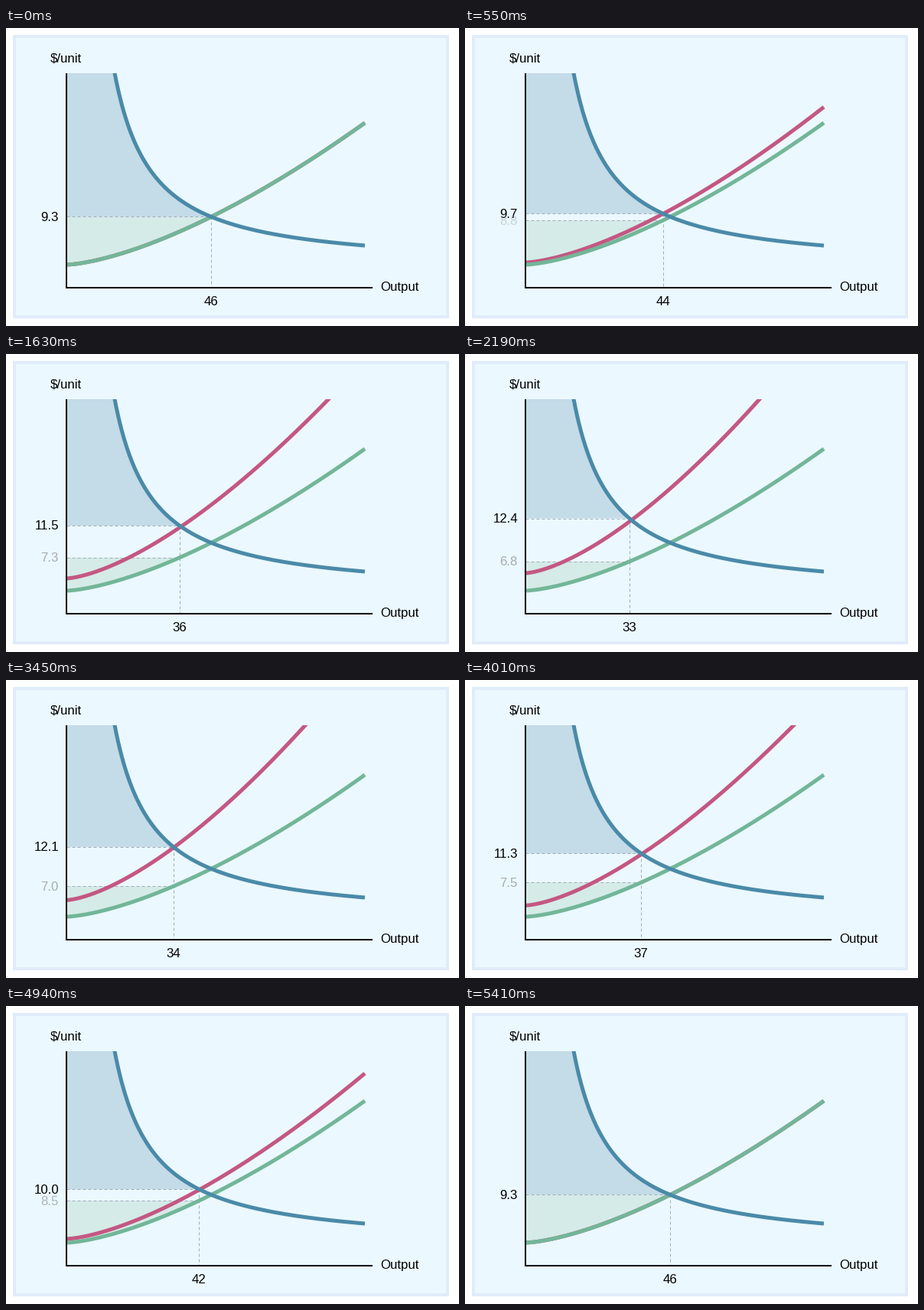
These frames come from a looping animation (592 by 389 pixels, 5500 ms). A matplotlib script:

```python
import numpy as np
import matplotlib.pyplot as plt
from matplotlib.animation import FuncAnimation
from matplotlib.patches import Polygon, Rectangle

W, H, DPI = 592, 389, 100
PX = 72 / DPI
LOOP, STEP = 5500, 50

# plot geometry in pixels
X0, Y0, TOP = 79, 339, 59
SX, SY, QMAX = 390 / 95, 10, 95

PANEL, BORDER = "#ebf8ff", "#e0ecf9"
BLUE, GREEN, RED = "#4a8aa8", "#72b698", "#c45783"
BLUE_FILL, GREEN_FILL = "#c4dbe8", "#d5ebe8"
DASH, MUTED = "#a3aeb8", "#a8abb2"

# markup over time: equilibrium guides run slightly ahead of the curve
GUIDE_T = [0, 300, 1050, 1600, 2150, 3250, 3450, 4500, 5000, 5400]
GUIDE_M = [1, 1, 1.30, 1.571, 1.83, 1.83, 1.737, 1.30, 1.145, 1]
CURVE_T = [0, 300, 1050, 1600, 2150, 2350, 3250, 3450, 4500, 5000, 5400]
CURVE_M = [1, 1, 1.288, 1.535, 1.765, 1.83, 1.83, 1.722, 1.28, 1.138, 1]


def supply(q):
    return 3 + 0.02 * q ** 1.5


def demand(q):
    return 2.644 + 468 / (q - 2) ** 1.125


def px(q):
    return X0 + SX * q


def py(p):
    return Y0 - SY * p


grid = np.linspace(25, 60, 3000)
ratio = demand(grid) / supply(grid)


def equilibrium(m):
    return np.interp(m, ratio[::-1], grid[::-1])


def points(q, p):
    return np.column_stack([px(q), py(p)])


plt.rcParams["font.family"] = "Liberation Sans"
fig = plt.figure(figsize=(W / DPI, H / DPI), dpi=DPI, facecolor="white")
ax = fig.add_axes([0, 0, 1, 1])
ax.set_xlim(0, W)
ax.set_ylim(H, 0)
ax.axis("off")

ax.add_patch(Rectangle((9, 9), 570, 370, fc=BORDER, lw=0))
ax.add_patch(Rectangle((13, 13), 562, 362, fc=PANEL, lw=0))
window = Rectangle((X0, TOP), 400, Y0 - TOP, transform=ax.transData)


def area(color):
    patch = Polygon([(0, 0), (1, 0), (1, 1)], fc=color, lw=0, zorder=2)
    return ax.add_patch(patch)


def guide():
    return ax.plot([], [], color=DASH, lw=PX, ls=(0, (4, 3)), zorder=3,
                   dash_capstyle="butt")[0]


def curve(color, q, p, z):
    line, = ax.plot(px(q), py(p), color=color, lw=5 * PX, zorder=z,
                    solid_capstyle="butt")
    line.set_clip_path(window)
    return line


def label(x, y, text="", ha="left", color="black"):
    return ax.text(x, y, text, ha=ha, va="baseline", color=color,
                   fontsize=16.8 * PX, zorder=9)


surplus, cost = area(BLUE_FILL), area(GREEN_FILL)
price_line, cost_line, output_line = guide(), guide(), guide()

q_all = np.linspace(0, QMAX, 240)
q_dem = np.linspace(14, QMAX, 400)
red = curve(RED, q_all, supply(q_all), 4)
curve(GREEN, q_all, supply(q_all), 5)
curve(BLUE, q_dem, demand(q_dem), 6)

ax.plot([X0, X0, 479], [TOP, Y0, Y0], color="black", lw=2 * PX, zorder=8,
        solid_capstyle="butt", solid_joinstyle="miter")
label(58, 44, "$/unit".replace("$", r"\$"))
label(489, 343, "Output")
price_text = label(69, 0, ha="right")
cost_text = label(69, 0, ha="right", color=MUTED)
output_text = label(0, 362, ha="center")

q_top = np.interp(28, demand(q_dem)[::-1], q_dem[::-1])


def update(i):
    t = i * STEP
    m = np.interp(t, GUIDE_T, GUIDE_M)
    q = equilibrium(m)
    p, c = demand(q), supply(q)
    x, y, yc = px(q), py(p), py(c)

    red.set_ydata(py(supply(q_all) * np.interp(t, CURVE_T, CURVE_M)))

    edge = np.linspace(q_top, q, 80)
    surplus.set_xy(np.vstack([[X0, y], [X0, TOP], points(edge, demand(edge))]))
    base = np.linspace(0, q, 60)
    cost.set_xy(np.vstack([[X0, yc], points(base, supply(base))]))

    price_line.set_data([X0, x], [y, y])
    cost_line.set_data([X0, x], [yc, yc])
    output_line.set_data([x, x], [y, Y0])

    split = m > 1.001
    cost_line.set_visible(split)
    cost_text.set_visible(split)
    cost_text.set_alpha(min(1, (m - 1) / 0.2))

    price_text.set_text(f"{p:.1f}")
    price_text.set_y(y + 5.5)
    cost_text.set_text(f"{c:.1f}")
    cost_text.set_y(yc + 5.5)
    output_text.set_text(f"{q:.0f}")
    output_text.set_x(x)
    return []


anim = FuncAnimation(fig, update, frames=LOOP // STEP, interval=STEP,
                     init_func=lambda: update(0), repeat=True,
                     repeat_delay=0, blit=False)
plt.show()
```
